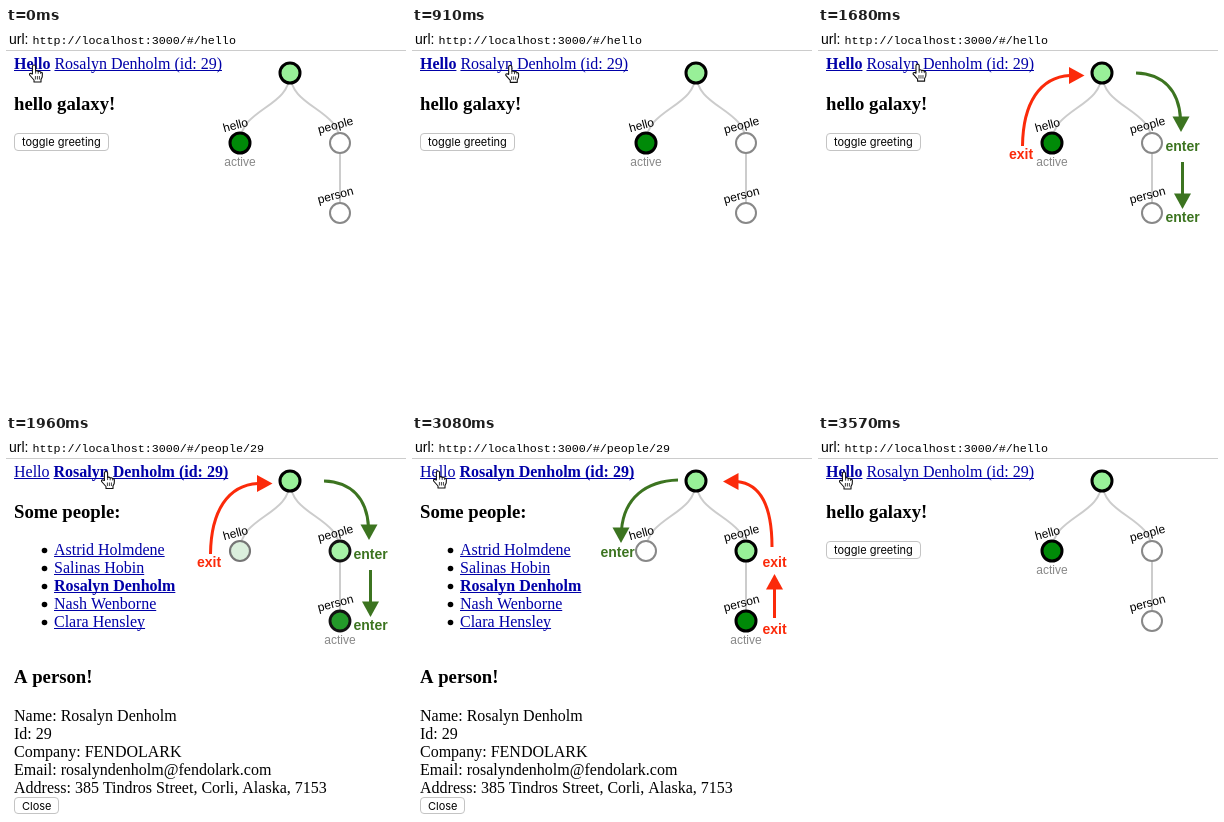
Animation, 400 px wide and 380 px high, one loop 3.64 s. Source, as an HTML page with a canvas:

```html
<!DOCTYPE html>
<html lang="en">
<head>
<meta charset="utf-8">
<title>Router state tree</title>
<style>
  html, body { margin: 0; width: 100%; height: 100%; overflow: hidden; background: #fff; }
  canvas { display: block; }
</style>
</head>
<body>
<canvas id="stage" width="400" height="380"></canvas>
<script>
const ctx = document.getElementById('stage').getContext('2d');

const LOOP = 3640, STEP = 70;
const OPEN_PERSON = 1820, OPEN_HELLO = 3220, FADE = 250;
const FORWARD_ARROWS = [1610, 2170], BACK_ARROWS = [3010, 3500];

const SERIF = '"Liberation Serif", "Times New Roman", serif';
const SANS = '"Liberation Sans", Arial, sans-serif';
const MONO = '"Liberation Mono", "Courier New", monospace';
const UI = 'Inter, sans-serif';
const LINK = '#0000a8', RED = '#fb2a0a', GREEN = '#3c7420';

const PERSON = 'Rosalyn Denholm';
const PEOPLE = ['Astrid Holmdene', 'Salinas Hobin', PERSON, 'Nash Wenborne', 'Clara Hensley'];
const DETAILS = [
  'Name: ' + PERSON,
  'Id: 29',
  'Company: FENDOLARK',
  'Email: rosalyndenholm@fendolark.com',
  'Address: 385 Tindros Street, Corli, Alaska, 7153'
];

// Node looks: fill, stroke, line width
const IDLE = [255, 255, 255, 136, 2];
const ENTERED = [152, 240, 152, 0, 3];
const ACTIVE = [0, 138, 8, 0, 3];

const NODES = [
  { x: 284, y: 45, hello: ENTERED, person: ENTERED },
  { x: 234, y: 115, label: 'hello', hello: ACTIVE, person: IDLE },
  { x: 334, y: 115, label: 'people', hello: IDLE, person: ENTERED },
  { x: 334, y: 185, label: 'person', hello: IDLE, person: ACTIVE }
];

// Pointer path: time, x, y of the fingertip
const POINTER = [
  [0, 28, 37], [70, 28, 37], [490, 88, 39], [700, 98, 37.5], [1330, 99, 37],
  [1960, 100, 35.5], [2240, 100, 35.5], [2520, 33, 31], [2700, 27, 34],
  [3080, 26, 35], [3570, 26, 36], [LOOP, 28, 37]
];
const HAND = new Path2D('M-1.6 9V1.4Q-1.4 0 0 0Q1.4 0 1.6 1.4V6Q3 5.2 4.2 6.4Q5.8 5.8 6.7 7.2' +
  'Q8.3 7 8.4 8.8L8.2 12L7 14.5V17H0V15L-4.4 10Q-4.8 8.2-3.2 8.4Z');
const FINGERS = new Path2D('M1.6 6V8.6M4.2 6.4V8.8M6.7 7.2V9M1.4 11V14.5M3.4 11V14.5M5.4 11V14.5');

const lerp = (a, b, p) => a + (b - a) * p;
const within = (t, [from, to]) => t >= from && t < to;

function text(str, x, y, font, color = '#000', align = 'left') {
  ctx.font = font;
  ctx.fillStyle = color;
  ctx.textAlign = align;
  ctx.fillText(str, x, y);
}

function link(str, x, y, bold) {
  text(str, x, y, `${bold ? 'bold ' : ''}16px ${SERIF}`, LINK);
  const width = ctx.measureText(str).width;
  ctx.fillRect(x, y + 1, width, 1);
  return x + width + 4;
}

function stroke(path, color, width) {
  ctx.strokeStyle = color;
  ctx.lineWidth = width;
  ctx.stroke(new Path2D(path));
}

function heading(str, y) {
  text(str, 8, y, `bold 18.72px ${SERIF}`);
}

function button(str, y, width, height) {
  ctx.beginPath();
  ctx.roundRect(8.5, y + 0.5, width, height, 3.5);
  ctx.fillStyle = '#fff';
  ctx.fill();
  ctx.strokeStyle = '#c4c4c4';
  ctx.lineWidth = 1;
  ctx.stroke();
  text(str, 16, y + height / 2 + 4.5, `11px ${UI}`);
}

function drawPage(onPerson) {
  text('url:', 3, 16, `14px ${SANS}`);
  text('http://localhost:3000/#/' + (onPerson ? 'people/29' : 'hello'), 26.5, 16, `11.7px ${MONO}`);
  ctx.fillStyle = '#ccc';
  ctx.fillRect(0, 22, 400, 1);

  const next = link('Hello', 8, 41, !onPerson);
  link(PERSON + ' (id: 29)', next, 41, onPerson);

  if (!onPerson) {
    heading('hello galaxy!', 82);
    button('toggle greeting', 105, 94, 17);
    return;
  }
  heading('Some people:', 82);
  PEOPLE.forEach((name, i) => {
    const y = 119 + i * 18;
    ctx.fillStyle = '#000';
    ctx.beginPath();
    ctx.arc(38.5, y - 4.5, 2.8, 0, 7);
    ctx.fill();
    link(name, 48, y, name === PERSON);
  });
  heading('A person!', 247);
  DETAILS.forEach((line, i) => text(line, 8, 285 + i * 18, `16px ${SERIF}`));
  button('Close', 361, 44, 16);
}

function drawTree(onPerson, progress) {
  stroke('M284 45C284 80 234 80 234 115M284 45C284 80 334 80 334 115V185', '#ccc', 2);
  const [before, after] = onPerson ? ['hello', 'person'] : ['person', 'hello'];
  for (const node of NODES) {
    const [r, g, b, line, width] = node[before].map((v, i) => lerp(v, node[after][i], progress));
    ctx.beginPath();
    ctx.arc(node.x, node.y, 10, 0, 7);
    ctx.fillStyle = `rgb(${r}, ${g}, ${b})`;
    ctx.fill();
    ctx.strokeStyle = `rgb(${line}, ${line}, ${line})`;
    ctx.lineWidth = width;
    ctx.stroke();
    if (node[after] === ACTIVE) {
      text('active', node.x, node.y + 23, `12px ${SANS}`, '#888', 'center');
    }
    if (node.label) {
      ctx.save();
      ctx.translate(node.x - 3.5, node.y - 14);
      ctx.rotate(-Math.PI / 12);
      text(node.label, 0, 0, `12px ${SANS}`, '#000', 'center');
      ctx.restore();
    }
  }
}

// The head's tip is at (x, y); angle 0 points right
function arrow(path, x, y, angle, color) {
  stroke(path, color, 3);
  ctx.save();
  ctx.translate(x, y);
  ctx.rotate(angle);
  ctx.fillStyle = color;
  ctx.fill(new Path2D('M0 0L-15.5-8.5V8.5Z'));
  ctx.restore();
}

function drawArrows(t) {
  const down = Math.PI / 2, font = `bold 14px ${SANS}`;
  if (within(t, FORWARD_ARROWS)) {
    arrow('M204.5 118C205 75 222 49 252 47.5', 266.5, 47.5, 0, RED);
    text('exit', 191, 131, font, RED);
    arrow('M318 45C345 46 361 62 362.5 91', 363, 104, down, GREEN);
    text('enter', 347.5, 123, font, GREEN);
    arrow('M364.5 134V168', 364.5, 181, down, GREEN);
    text('enter', 347.5, 193.5, font, GREEN);
  }
  if (within(t, BACK_ARROWS)) {
    arrow('M266 44C234 45 212 62 209.5 94', 209, 107, down, GREEN);
    text('enter', 188.5, 121, font, GREEN);
    arrow('M360 111C360 72 350 48 325 45.5', 311, 45.5, Math.PI, RED);
    text('exit', 350.5, 131, font, RED);
    arrow('M362.5 182V150', 362.5, 138, -down, RED);
    text('exit', 350.5, 198, font, RED);
  }
}

function drawPointer(t) {
  const i = POINTER.findIndex(key => key[0] > t);
  const [t0, x0, y0] = POINTER[i - 1], [t1, x1, y1] = POINTER[i];
  const p = (t - t0) / (t1 - t0), eased = p * p * (3 - 2 * p);
  ctx.save();
  ctx.translate(lerp(x0, x1, eased), lerp(y0, y1, eased));
  ctx.fillStyle = '#fff';
  ctx.fill(HAND);
  ctx.strokeStyle = '#111';
  ctx.lineWidth = 1.1;
  ctx.lineJoin = 'round';
  ctx.stroke(HAND);
  ctx.lineWidth = 0.8;
  ctx.stroke(FINGERS);
  ctx.restore();
}

function draw() {
  const t = Math.floor(performance.now() % LOOP / STEP) * STEP;
  const onPerson = within(t, [OPEN_PERSON, OPEN_HELLO]);
  const since = (t - (onPerson ? OPEN_PERSON : OPEN_HELLO) + LOOP) % LOOP;
  const progress = 1 - (1 - Math.min(since / FADE, 1)) ** 2.4;

  ctx.fillStyle = '#fff';
  ctx.fillRect(0, 0, 400, 380);
  drawPage(onPerson);
  drawTree(onPerson, progress);
  drawArrows(t);
  drawPointer(t);
  requestAnimationFrame(draw);
}
draw();
</script>
</body>
</html>
```
